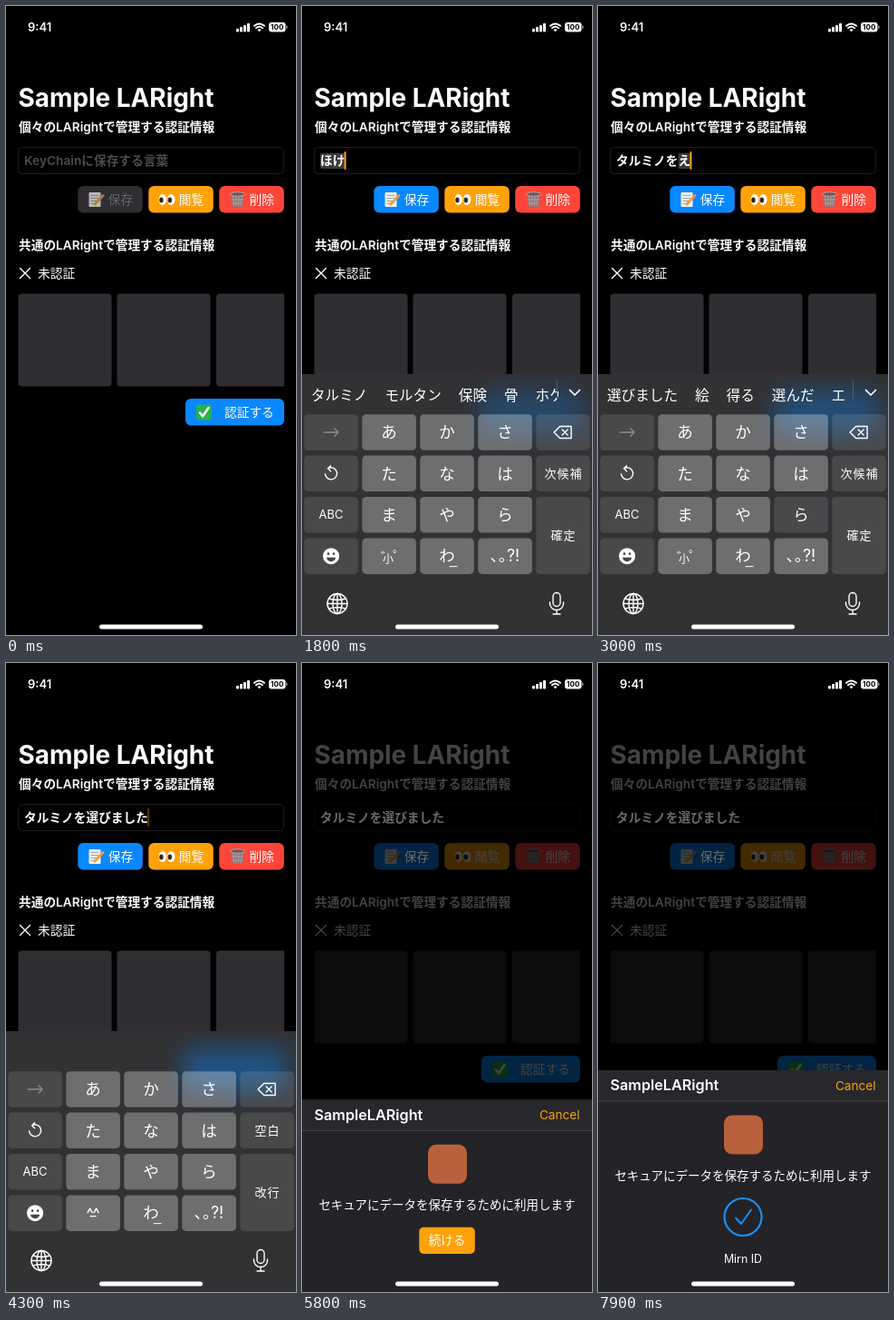
Write an HTML page that moves like this. It is 320 px wide and 692 px high and loops after 8000 ms.

```html
<!DOCTYPE html>
<html lang="ja">
<head>
<meta charset="utf-8">
<title>Sample LARight</title>
<style>
html, body { margin: 0; width: 100%; height: 100%; overflow: hidden; background: #000; }
svg { display: block; width: 320px; height: 692px; }
text { font-family: Inter, "Noto Sans CJK JP", "Noto Sans CJK", sans-serif; fill: #fff; white-space: pre; }
.line { fill: none; stroke: #fff; stroke-width: 1.4; stroke-linecap: round; stroke-linejoin: round; }
</style>
</head>
<body>
<svg id="stage" viewBox="0 0 320 692"></svg>
<script>
const LOOP = 8000, STEP = 100;
const BLUE = '#0a88ff', ORANGE = '#ffa20a', RED = '#ff453a', CARD = '#302e32', RING = '#1a90ff';
const BODY = 13.7, KB_HEIGHT = 287, SHEET_HEIGHT = 212, SHEET_GROW = 32;

const text = (x, y, size, str, attrs = '') =>
  `<text x="${x}" y="${y}" font-size="${size}" ${attrs}>${str}</text>`;
const mid = (x, y, size, str, attrs = '') => text(x, y, size, str, 'text-anchor="middle" ' + attrs);
const box = (x, y, w, h, r, fill, attrs = '') =>
  `<rect x="${x}" y="${y}" width="${w}" height="${h}" rx="${r}" fill="${fill}" ${attrs}/>`;
const line = (d, attrs = '') => `<path class="line" d="${d}" ${attrs}/>`;
const group = (id, inner, attrs = '') => `<g id="${id}" ${attrs}>${inner}</g>`;
const at = (x, y, inner) => `<g transform="translate(${x} ${y})">${inner}</g>`;
const SEMI = 'font-weight="600"';

// Small pictograms, centred on (0, 0)
const memo = box(-7.5, -8, 13, 16, 1, '#f2f2f0') +
  line('M-5-4.500H3M-5-1.500H3M-5 1.500H1M-5 4.500H0', 'style="stroke:#9aa4ae;stroke-width:1"') +
  line('M7.500-4L-1 5', 'style="stroke:#f0a030;stroke-width:3"') +
  line('M8-4.500L7-3.500', 'style="stroke:#e58a8a;stroke-width:3"');
const eye = x => `<ellipse cx="${x}" rx="4.300" ry="6" fill="#fff"/><ellipse cx="${x - 1.4}" cy=".5" rx="2.200" ry="3" fill="#33231d"/>`;
const eyes = eye(-4.7) + eye(4.7);
const bin = '<path d="M-7.500-6H7.500L5.500 8H-5.500Z" fill="#8d7474"/>' +
  line('M-5-4L-3.500 7M-1.700-4L-1.200 7M1.700-4L1.200 7M5-4L3.500 7M-6 0H6M-5.500 4H5.500', 'style="stroke:#b9a5a5;stroke-width:.8"') +
  '<ellipse cy="-6" rx="8" ry="2.200" fill="#6b5557" stroke="#b7a6a6"/>';
const tick = box(-8.5, -8.5, 17, 17, 3, '#27b34a') +
  line('M-4.500 .5L-1.500 4.500L5-5', 'style="stroke-width:2.6"');

const status = text(24, 28, 13, '9:41', SEMI) +
  [0, 1, 2, 3].map(i => box(254 + i * 4, 25 - i * 2, 3, 3.5 + i * 2, .8, '#fff')).join('') +
  line('M274 21.800Q279.500 17 285 21.800M276 24.300Q279.500 21 283 24.300', 'style="stroke-width:1.9"') +
  '<path d="M277.500 26Q279.500 24.300 281.500 26L279.500 28.500Z" fill="#fff"/>' +
  box(290, 18, 18.5, 10.5, 3, '#fff') + box(309.2, 21.5, 1.3, 3.6, .6, '#999') +
  mid(299.2, 26.2, 8, '100', 'font-weight="700" style="fill:#000"');

const app = text(13.5, 111, 27.9, 'Sample LARight', 'font-weight="700"') +
  text(14, 138, BODY, '個々のLARightで管理する認証情報', SEMI) +
  box(13.5, 155.5, 293, 29, 5, '#000', 'stroke="#1e1e20"') +
  group('holder', text(20, 175.3, BODY, 'KeyChainに保存する言葉', SEMI + ' style="fill:#4c4c50"')) +
  box(0, 162, 0, 17, 2, '#3b3b3e', 'id="mark"') +
  text(20, 175.3, BODY, '', SEMI + ' id="typed"') +
  box(0, 160, 2, 20, 1, ORANGE, 'id="caret"') +
  group('save', box(79.3, 198, 71.5, 29.6, 6, CARD, 'id="saveBox"') +
    at(99, 213, `<g id="saveIcon">${memo}</g>`) + text(112.7, 217.8, BODY, '保存', 'id="saveText"')) +
  box(157.3, 198, 71.5, 29.6, 6, ORANGE) + at(177.5, 213, eyes) + text(190.7, 217.8, BODY, '閲覧') +
  box(235.3, 198, 71.5, 29.6, 6, RED) + at(255.5, 213, bin) + text(268.5, 217.8, BODY, '削除') +
  text(14, 268, BODY, '共通のLARightで管理する認証情報', SEMI) +
  line('M15.500 288.500L26.500 299.500M26.500 288.500L15.500 299.500') +
  text(35, 299.3, BODY, '未認証') +
  box(13.5, 316.5, 103, 102, 4, CARD) + box(122.5, 316.5, 103, 102, 4, CARD) +
  `<path d="M307 316.500H236a4 4 0 0 0-4 4V414.500a4 4 0 0 0 4 4H307Z" fill="${CARD}"/>` +
  box(198, 432, 109, 29.6, 6, BLUE) + at(218.5, 447, tick) + text(241, 452, BODY, '認証する');

// Keyboard
const colX = c => 2.3 + c * 64, rowY = r => 449.2 + r * 45.4;
const key = (c, r, inner, id = '', h = 39.5) =>
  box(colX(c), rowY(r), 59.6, h, 4.5, '#fff', `fill-opacity="${c % 4 ? .29 : .115}" ${id && `id="${id}"`}`) +
  at(colX(c) + 29.8, rowY(r) + h / 2, inner);
const kana = [['あ', 'か', 'さ'], ['た', 'な', 'は'], ['ま', 'や', 'ら']];
const side = id => mid(.5, 4.7, 13, '', `id="${id}" letter-spacing="1"`);
const undo = line('M-3.500-5.500A6.500 6.500 0 1 1-6.500 .5M-3.500-5.500L-.5-8.500M-3.500-5.500L-.5-2.500');
const erase = line('M-3.500-6.500H9V6.500H-3.500L-10 0ZM-1-3L5 3M5-3L-1 3');
const smile = '<circle r="9" fill="#fff"/><circle cx="-3" cy="-2.500" r="1.300" fill="#444"/>' +
  '<circle cx="3" cy="-2.500" r="1.300" fill="#444"/><path d="M-5 1.500H5A5 4.500 0 0 1-5 1.500Z" fill="#444"/>';
const keys = kana.map((row, r) => row.map((k, i) =>
    key(i + 1, r, mid(0, 6.2, 17.5, k), 'key' + k)).join('')).join('') +
  key(0, 0, line('M-8 0H8M4-4L8 0L4 4', 'style="stroke:#8b8a8d"')) +
  key(0, 1, group('undo', undo)) +
  key(0, 2, mid(0, 4.7, 13, 'ABC')) +
  key(0, 3, smile) +
  key(1, 3, group('face', line('M-6-.5L-3.500-5L-1-.5M1-.5L3.500-5L6-.5M-3 3.500H3')) +
    group('voiced', mid(-1, 8, 12, '小') + text(-9, 7, 15, '゛') + text(4, 6, 15, '゜')), 'keyMark') +
  key(2, 3, mid(0, 6.2, 17.5, 'わ') + line('M3 11.500H11', 'style="stroke-width:1"'), 'keyわ') +
  key(3, 3, mid(0, 5.5, 18, '､｡?!')) +
  key(4, 0, erase) + key(4, 1, side('space')) + key(4, 2, side('enter'), '', 85);

const globe = '<circle class="line" r="11"/><ellipse class="line" rx="5" ry="11"/>' +
  line('M0-11V11M-11 0H11M-9-5.500Q0-2.500 9-5.500M-9 5.500Q0 2.500 9 5.500');
const mic = '<rect class="line" x="-4" y="-12" width="8" height="15" rx="4"/>' +
  line('M-7.500-1.500V0A7.500 7 0 0 0 7.500 0V-1.500M0 7V11.500M-4 11.500H4');
const keyboard = box(0, 405, 320, 300, 0, '#323134') +
  '<g clip-path="url(#panel)"><g id="glow" filter="url(#soft)">' + box(194, 423, 117, 48, 14, '#0a78d8') + '</g></g>' +
  keys +
  group('bar', '<g clip-path="url(#strip)"><text id="cands" y="434" font-size="15.600"></text></g>' +
    line('M281.500 412V432', 'style="stroke:#5c5b5f;stroke-width:1"') + line('M295.500 422.500L301 428L306.500 422.500', 'style="stroke-width:1.7"')) +
  at(39, 657.5, globe) + at(281, 657.5, mic);

// Authentication sheet
const sheet = box(0, 480, 320, 260, 0, '#242327') + box(0, 480, 320, 34, 0, '#28272b') +
  box(0, 513.5, 320, 1, 0, '#444347') +
  text(13.5, 502.3, 16.2, 'SampleLARight', SEMI) +
  text(306.5, 502, 13.6, 'Cancel', `text-anchor="end" style="fill:${ORANGE}"`) +
  box(139, 529.5, 43, 43, 9, '#b8613d') +
  mid(160, 601, 13.5, 'セキュアにデータを保存するために利用します') +
  group('go', box(129.3, 620.3, 61.5, 29.3, 5, ORANGE) + mid(160, 640, 13.5, '続ける')) +
  group('auth', `<rect id="ring" class="line" x="139.500" y="621" width="41" height="41" pathLength="100" style="stroke:${RING};stroke-width:2.200"/>` +
    line('M152 642.500L158 649L169 633.500', `id="check" pathLength="100" style="stroke:${RING};stroke-width:2"`) +
    mid(160, 692, 12.4, 'Mirn ID'));

const stage = document.getElementById('stage');
stage.innerHTML = `<defs>
  <filter id="soft" x="-50%" y="-150%" width="200%" height="400%"><feGaussianBlur stdDeviation="13"/></filter>
  <clipPath id="panel"><rect y="405" width="320" height="300"/></clipPath>
  <clipPath id="strip"><rect y="405" width="283" height="44"/></clipPath></defs>` +
  box(0, 0, 320, 692, 0, '#000') + app + group('kb', keyboard) +
  box(0, 50, 320, 642, 0, '#000', 'id="dim"') +
  group('bright', text(20, 175.3, BODY, 'タルミノを選びました', SEMI) + text(112.7, 217.8, BODY, '保存')) +
  group('sheet', sheet) + status + box(103, 680.5, 114, 5, 2.5, '#fff');

const $ = id => document.getElementById(id);
const set = (id, attrs) => { for (const k in attrs) $(id).setAttribute(k, attrs[k]); };
const show = (id, v) => set(id, { opacity: +v });
const clamp = v => Math.max(0, Math.min(1, v));
const ramp = (t, a, b) => clamp((t - a) / (b - a));
// Distance left to travel, from 1 down to 0, critically damped
const spring = (t, start) => {
  const s = Math.max(0, t - start) * .0153;
  return (1 + s) * Math.exp(-s);
};

// time, settled text, text being composed, suggestions
const typing = [
  [0, '', '', ''],
  [1600, '', 'ほ', '保険 骨 本 方 ホ'],
  [1800, '', 'ほけ', 'タルミノ モルタン 保険 骨 ホケ'],
  [2100, '', 'ほげ', 'タルミノ 捕鯨 ホゲ ほげ'],
  [2400, 'タルミノ', '', ''],
  [2700, 'タルミノを', '', ''],
  [2900, 'タルミノを', 'え', '選びました 絵 得る 選んだ エ'],
  [3100, 'タルミノを', 'えら', '選びました 選んだ 選ぶ エラ'],
  [3300, 'タルミノを', 'えらび', '選びました 選び 選びます'],
  [3500, 'タルミノを選びました', '', '']
];
// key, pressed from
const presses = [['は', 1500], ['か', 1700], ['Mark', 2000], ['わ', 2600], ['あ', 2800], ['ら', 3000], ['は', 3200]];
const blink = [[4300, .35], [4400, .12], [4500, 0], [4700, 1]];

function drawTyping(t) {
  const [, done, draft, list] = typing.filter(s => s[0] <= t).pop();
  const full = done + draft, live = draft !== '';
  $('typed').textContent = full;
  show('holder', !full);
  const start = 20 + done.length * BODY, end = 20 + full.length * BODY;
  set('mark', { x: start, width: draft.length * BODY });
  const fade = blink.filter(b => b[0] <= t).pop();
  set('caret', { x: full ? end - .8 : 19.5 });
  show('caret', t < 800 || t >= 5200 ? 0 : fade ? fade[1] : 1);

  set('saveBox', { fill: full ? BLUE : CARD });
  $('saveText').style.fill = full ? '#fff' : '#67666b';
  show('saveIcon', full ? 1 : .7);
  show('save', t >= 5000 && t < 5200 ? .5 : 1);

  show('undo', full ? 1 : .4);
  show('face', !live);
  show('voiced', live);
  $('space').textContent = live ? '次候補' : '空白';
  $('enter').textContent = live ? '確定' : '改行';
  show('bar', live);
  let x = 10;
  $('cands').innerHTML = list.split(' ').map(w => {
    const span = `<tspan x="${x}">${w}</tspan>`;
    x += w.length * 15.6 + 19;
    return span;
  }).join('');
  for (const [k] of presses) {
    const down = presses.some(p => p[0] === k && t >= p[1] && t < p[1] + STEP);
    set('key' + k, { 'fill-opacity': down ? .115 : .29 });
  }
}

function drawPanels(t) {
  const kb = t < 780 ? 1 : t < 5080 ? spring(t, 780) : 1 - spring(t, 5080);
  const drop = kb * KB_HEIGHT;
  set('kb', { transform: `translate(0 ${drop})` });
  // The glow belongs to the button underneath, so it stays put
  set('glow', { transform: `translate(0 ${-drop})` });
  show('glow', .2 + .12 * ramp(t, 1200, 1800) + .16 * ramp(t, 2400, 3500));

  const down = spring(t, 5230);
  const grow = 1 - spring(t, 6380);
  set('sheet', { transform: `translate(0 ${down * SHEET_HEIGHT - grow * SHEET_GROW})` });
  show('dim', .74 * (1 - down));
  show('bright', .2 * (1 - down));
  show('go', (t >= 6300 ? .5 : 1) * (1 - ramp(t, 6380, 6600)));
  show('auth', ramp(t, 6500, 6800));

  const round = ramp(t, 7200, 7500), spin = ramp(t, 7300, 7800);
  const busy = t >= 7300 && t < 7700;
  set('ring', {
    rx: 9 + 11.5 * round,
    'stroke-dasharray': busy ? '72 28' : 'none',
    transform: `rotate(${busy ? spin * 360 : 0} 160 641.5)`
  });
  const drawn = ramp(t, 7500, 7800);
  set('check', { 'stroke-dasharray': `${drawn * 100} 200` });
  show('check', drawn > 0);
}

const begin = performance.now();
function frame() {
  const t = Math.floor((performance.now() - begin) % LOOP / STEP) * STEP;
  drawTyping(t);
  drawPanels(t);
  requestAnimationFrame(frame);
}
frame();
</script>
</body>
</html>
```
